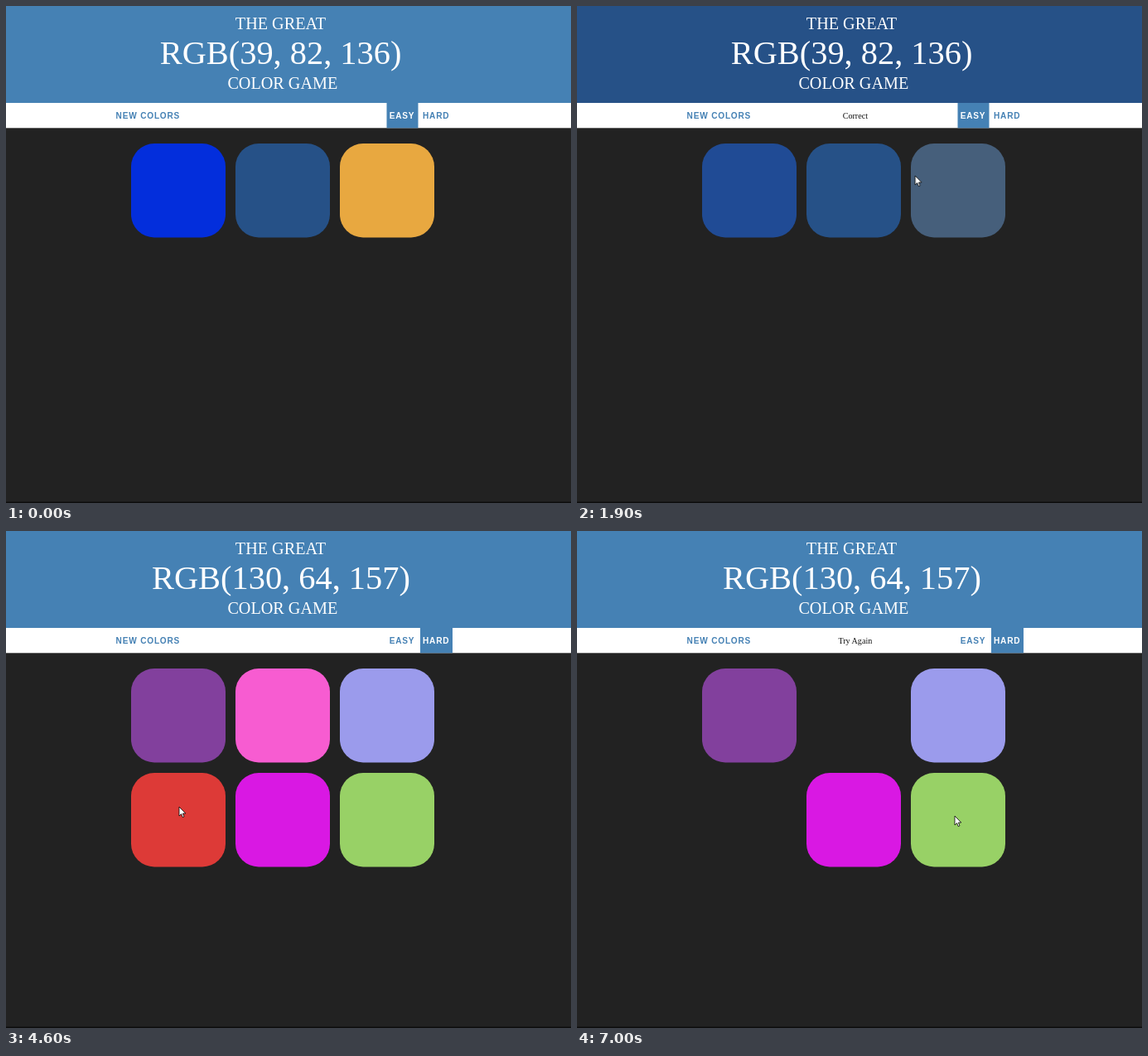
An HTML page for the animation above (7.1 s loop, 682 px wide and 600 px high).

```html
<!DOCTYPE html>
<html lang="en">
<head>
<meta charset="utf-8">
<title>Color game</title>
<style>
  :root { --steel: #4581b4; --answer: #265187; --dark: #222; }
  html, body { margin: 0; width: 100%; height: 100%; overflow: hidden; background: var(--dark); }
  svg { display: block; width: 682px; height: 600px; }
  svg * { animation-duration: 7.1s; animation-iteration-count: infinite; animation-timing-function: step-end; }

  .title { font: 20.2px "Liberation Serif", "Times New Roman", serif; fill: #fff; }
  .title .big { font-size: 40.4px; }
  .note { font: 10.1px "Liberation Serif", "Times New Roman", serif; fill: #111; }
  .label { font: bold 10.1px "Liberation Sans", Arial, sans-serif; letter-spacing: .8px; fill: var(--steel); }
  .on .label { fill: #fff; }
  .on rect { fill: var(--steel); }
  .square { width: 114px; height: 113.5px; rx: 28px; fill: var(--hard); }

  .banner { fill: var(--steel); animation-name: banner; }
  .first { animation-name: leave; }
  .second { animation-name: arrive; }
  .correct { animation-name: correct; }
  .again { animation-name: again; }
  .easy { animation-name: easy; animation-timing-function: linear; }
  .hard { animation-name: hard; animation-timing-function: ease; }
  .recolor { animation-name: recolor; }
  .pink { animation-name: recolor, pink; }
  .red { animation-name: red; }
  .cursor { animation-name: cursor; animation-timing-function: linear; }

  @keyframes banner {
    0% { fill: var(--steel); }
    22.25% { fill: var(--answer); }
    46.97%, 100% { fill: var(--steel); }
  }
  @keyframes leave { 0% { opacity: 1; } 46.97%, 100% { opacity: 0; } }
  @keyframes arrive { 0% { opacity: 0; } 46.97%, 100% { opacity: 1; } }
  @keyframes correct { 0% { opacity: 0; } 22.25% { opacity: 1; } 46.97%, 100% { opacity: 0; } }
  @keyframes again { 0% { opacity: 0; } 67.61%, 100% { opacity: 1; } }
  @keyframes easy { 0%, 46.97% { opacity: 1; } 49.3% { opacity: .67; } 52.1%, 100% { opacity: 0; } }
  @keyframes hard { 0%, 40.85% { opacity: 0; } 44.5%, 100% { opacity: 1; } }
  @keyframes recolor {
    0% { fill: var(--easy); }
    22.25% { fill: var(--easy); animation-timing-function: ease; }
    30.7% { fill: var(--answer); }
    46.97% { fill: var(--answer); animation-timing-function: ease; }
    55.42%, 100% { fill: var(--hard); }
  }
  @keyframes red {
    0%, 67.61% { opacity: 1; animation-timing-function: ease; }
    76.06%, 100% { opacity: 0; }
  }
  @keyframes pink {
    0%, 81.69% { opacity: 1; animation-timing-function: ease; }
    90.14%, 100% { opacity: 0; }
  }
  @keyframes cursor {
    0%, 6.4% { transform: translate(434px, 612px); }
    11.27% { transform: translate(431px, 319px); }
    12.68% { transform: translate(429px, 275px); }
    18.3% { transform: translate(352px, 212px); }
    23.2% { transform: translate(346px, 208px); animation-timing-function: ease-in; }
    26.76% { transform: translate(408px, 205px); }
    32.4% { transform: translate(478px, 160px); }
    40.85% { transform: translate(512px, 130px); }
    46.97% { transform: translate(508px, 132px); }
    49.3% { transform: translate(466px, 135px); }
    55% { transform: translate(270px, 280px); animation-timing-function: ease-out; }
    61.9%, 70.4% { transform: translate(209px, 333px); animation-timing-function: ease-in-out; }
    78.8%, 86% { transform: translate(330px, 218px); animation-timing-function: ease-in-out; }
    95.8%, 100% { transform: translate(456px, 344px); }
  }
</style>
</head>
<body>
<svg viewBox="0 0 682 600">
  <rect width="682" height="600" fill="#222"/>
  <rect y="598.5" width="682" height="1.5" fill="#0c0c0c"/>
  <rect class="banner" width="682" height="117"/>
  <rect y="117" width="682" height="30.3" fill="#fff"/>

  <g class="title">
    <text x="276.8" y="27.8">THE GREAT</text>
    <text class="big first" x="185.7" y="70">RGB(39, 82, 136)</text>
    <text class="big second" x="176" y="70">RGB(130, 64, 157)</text>
    <text x="267.4" y="99.8">COLOR GAME</text>
  </g>

  <text class="label" x="132.6" y="135.6">NEW COLORS</text>
  <text class="note correct" x="320.7" y="135.6">Correct</text>
  <text class="note again" x="315.4" y="135.6">Try Again</text>
  <text class="label" x="462.7" y="135.6">EASY</text>
  <text class="label" x="503" y="135.6">HARD</text>
  <g class="on easy">
    <rect x="459.5" y="117" width="38" height="30.3"/>
    <text class="label" x="462.7" y="135.6">EASY</text>
  </g>
  <g class="on hard">
    <rect x="500" y="117" width="39" height="30.3"/>
    <text class="label" x="503" y="135.6">HARD</text>
  </g>

  <rect class="square recolor" x="151" y="166" style="--easy:#032edc; --hard:#82409d"/>
  <rect class="square recolor pink" x="277" y="166" style="--easy:#265187; --hard:#f75cd1"/>
  <rect class="square recolor" x="403" y="166" style="--easy:#e8a840; --hard:#9b9bec"/>
  <g class="second">
    <rect class="square red" x="151" y="292" style="--hard:#dd3a37"/>
    <rect class="square" x="277" y="292" style="--hard:#d918e3"/>
    <rect class="square" x="403" y="292" style="--hard:#98d166"/>
  </g>

  <path class="cursor" d="M0 0V11L2.6 8.6 4.2 12.6 6 11.8 4.4 8H7.8Z" fill="#fff" stroke="#000" stroke-width=".8"/>
</svg>
</body>
</html>
```
